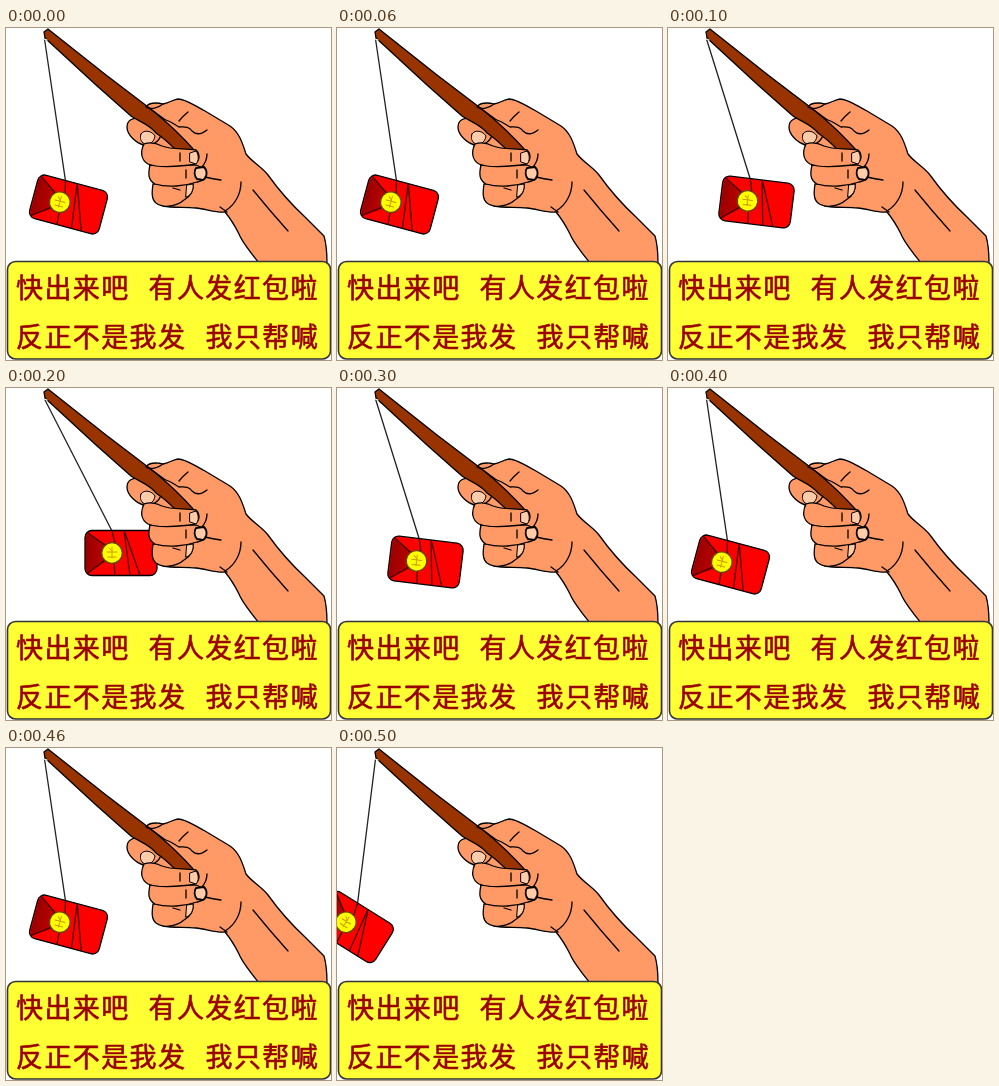
Recreate the animation shown at these times as an HTML page. Size 325x332 px, loop 600 ms.

```html
<!DOCTYPE html>
<html lang="zh-CN">
<meta charset="utf-8">
<style>
html, body { margin: 0; width: 100%; height: 100%; overflow: hidden; background: #fff }
svg { display: block; width: 325px; height: 332px }
text { font: 27px "Noto Sans CJK SC", "Noto Sans CJK", sans-serif; letter-spacing: 1.4px; fill: #900; stroke: #900; stroke-width: .6 }
</style>
<svg viewBox="0 0 325 332" fill="none" stroke="#000" stroke-width="1.3" stroke-linejoin="round" stroke-linecap="round">
  <defs>
    <linearGradient id="shade"><stop stop-color="#900"/><stop offset="1" stop-color="#c00"/></linearGradient>
  </defs>
  <line id="cord" x1="38.5" y1="11" stroke="#222"/>
  <g id="packet">
    <rect x="-36" y="-22.5" width="72" height="45" rx="7" fill="#f00"/>
    <path d="M-33-20L-9-5V5L-33 20Q-35 18-35 14V-14Q-35-18-33-20Z" fill="url(#shade)" stroke="none"/>
    <path d="M-33-20L-15-7M-33 20L-16 7M-9-22L-6-10M3-22L9 22M4-20L19 22M-7 11L-6 22" stroke="#400"/>
    <circle cx="-9" r="10.3" fill="#ff0" stroke="#640"/>
    <path d="M-14-1H-4M-13 4H-5M-9-6V5M-12-5L-10-3" stroke="#c90" stroke-width="1"/>
  </g>
  <!-- arm and back of the hand -->
  <path fill="#f96" d="M140 79C142 75 150 74 157 76C163 75 166 72 172 71C180 71 189 78 199 83L224 98C234 105 237 117 240 126C246 134 256 139 262 147C272 161 286 177 299 189L318 208C320 215 321 226 321 235H253C245 225 236 214 233 206C229 198 224 190 219 184C211 185 200 181 190 180C177 179 166 180 157 178L137 117L146 90Z"/>
  <!-- index finger, then the rod across it -->
  <path fill="#f96" d="M136 90C127 89 121 92 121 99C121 107 130 115 138 117C146 118 153 114 155 107C149 100 143 95 136 90Z"/>
  <path fill="#930" d="M38 4L42 1L47 5L100 47L146 82C157 91 174 106 188 122L170 122C163 115 156 109 150 105C143 96 134 94 125 88L90 57L39 10Z"/>
  <path fill="#fca" stroke-width="1" d="M135 106C138 101 146 103 149 108C148 115 142 118 137 115C134 112 134 109 135 106Z"/>
  <path stroke="#fff" d="M38 11L41 12"/>
  <!-- thumb -->
  <path d="M140 79C145 82 152 80 157 76M140 79C148 82 154 89 160 92C166 94 169 97 173 99C178 99 183 98 186 103Q192 109 201 102M182 84Q176 89 173 93"/>
  <!-- remaining fingers -->
  <g fill="#f96">
    <path d="M147 156C146 163 145 171 150 175C158 181 171 178 178 172C185 168 188 162 187 155Z"/>
    <path d="M144 137C142 146 142 152 149 156C162 160 179 158 191 154C199 153 202 147 199 141L190 137Z"/>
    <path d="M138 116C134 124 135 132 142 136C154 141 173 138 184 137C194 136 195 127 190 122C177 120 166 122 156 118C150 115 143 114 138 116Z"/>
  </g>
  <g fill="#fca" stroke-width="1">
    <path d="M184 125L190 123C193 127 193 133 190 136L184 134Z"/>
    <path d="M181 157L187 156C188 163 184 168 180 169Z"/>
    <path d="M190 140L198 139C202 143 201 150 197 152L191 151C188 148 188 143 190 140Z" stroke-width="1.8"/>
  </g>
  <path d="M199 149Q207 151 215 152M174 125V133M180 142V150M167 160L174 162M235 154C235 166 229 177 219 183M214 179L221 184M196 139Q201 133 201 126M247 162Q264 183 282 203"/>
  <rect x="1.5" y="233.5" width="323" height="97.5" rx="8" fill="#ff3" stroke="#333" stroke-width="1.6"/>
  <g stroke="none">
    <text y="269.5"><tspan x="10">快出来吧</tspan><tspan x="142.5">有人发红包啦</tspan></text>
    <text y="318.5"><tspan x="10">反正不是我发</tspan><tspan x="199.5">我只帮喊</tspan></text>
  </g>
</svg>
<script>
const cord = document.getElementById("cord"), packet = document.getElementById("packet");
// packet centre and tilt, from the left end of the swing to the right
const poses = [[16.5, 179, 32], [62.5, 176.5, 15], [88.5, 174, 7], [115, 165, 0]];
const order = [1, 2, 3, 2, 1, 0];

function draw(now) {
  const [x, y, tilt] = poses[order[Math.floor(now / 100) % 6]];
  const a = tilt * Math.PI / 180, c = Math.cos(a), s = Math.sin(a);
  packet.setAttribute("transform", `translate(${x} ${y}) rotate(${tilt})`);
  cord.setAttribute("x2", x - 9 * c + 22 * s);
  cord.setAttribute("y2", y - 9 * s - 22 * c);
}

const start = performance.now();
function tick() {
  draw(performance.now() - start);
  requestAnimationFrame(tick);
}
tick();
</script>
</html>
```
